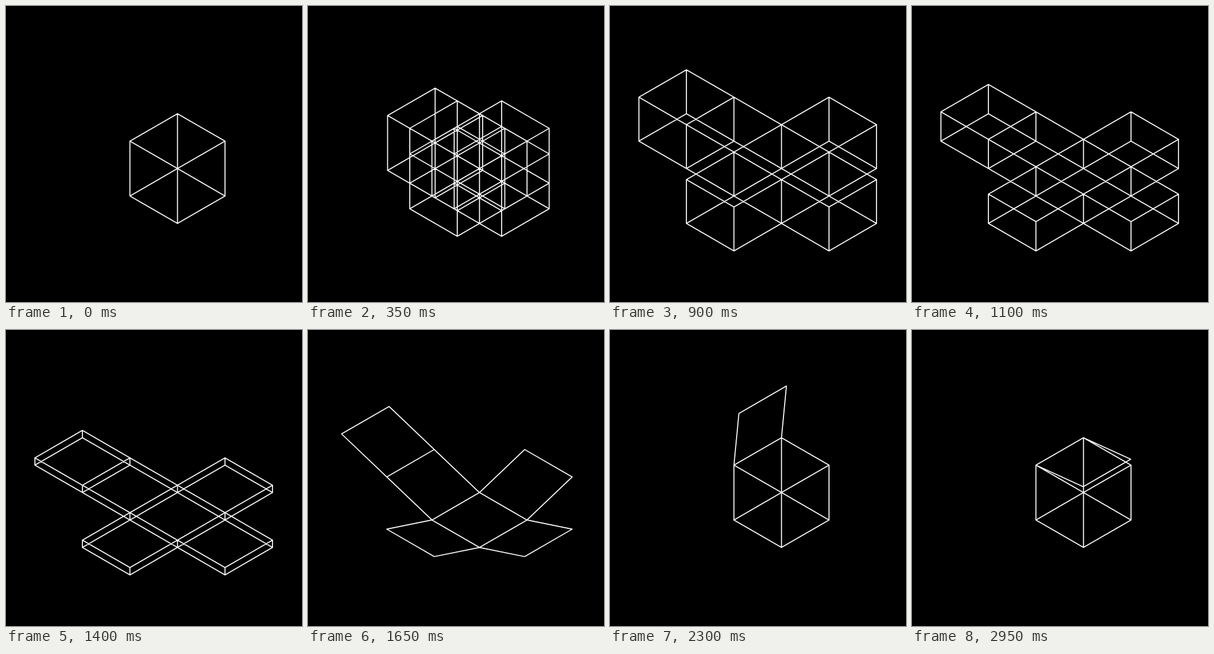
Recreate the animation shown at these times as an HTML page with a canvas. Size 500x500 px, loop 3000 ms.

```html
<!DOCTYPE html>
<html lang="en">
<head>
<meta charset="utf-8">
<title>Unfolding cube</title>
<style>
  html, body { margin: 0; height: 100%; overflow: hidden; background: #000; }
  canvas { display: block; }
</style>
</head>
<body>
<canvas id="stage" width="500" height="500"></canvas>
<script>
const ctx = document.getElementById('stage').getContext('2d');
const LOOP = 3000, STEP = 50, PHASE = 750;
const EDGE = 92.7;
const DX = EDGE * Math.sqrt(3) / 2, DY = EDGE / 2;

// Isometric projection of a point in units of the cube's edge
const project = ([x, y, z]) => [289.65 + (x - y) * DX, 274.6 + (x + y) * DY - z * EDGE];
const add = (p, q) => p.map((v, i) => v + q[i]);

function poly(points, closed = true) {
  points.forEach((p, i) => ctx[i ? 'lineTo' : 'moveTo'](...project(p)));
  if (closed) ctx.closePath();
}

// Parallelogram at p spanned by u and v
const face = (p, u, v) => poly([p, add(p, u), add(add(p, u), v), add(p, v)]);

function box(x, y, h) {
  for (const z of [0, h]) face([x, y, z], [1, 0, 0], [0, 1, 0]);
  for (const [i, j] of [[0, 0], [1, 0], [1, 1], [0, 1]])
    poly([[x + i, y + j, 0], [x + i, y + j, h]], false);
}

function boxes(slide, h) {
  for (const [x, y] of [[0, 0], [1, 0], [0, 1], [0, -1], [-1, 0], [-2, 0]])
    box(x * slide, y * slide, h);
}

function net(fold, lidFold) {
  const c = Math.cos(fold), s = Math.sin(fold);
  const X = [1, 0, 0], Y = [0, 1, 0], back = [-c, 0, s];
  face([0, 0, 0], X, Y);
  face([1, 0, 0], Y, [c, 0, s]);
  face([0, 1, 0], X, [0, c, s]);
  face([0, 0, 0], X, [0, -c, s]);
  face([0, 0, 0], Y, back);
  const a = fold + lidFold;
  face(back, Y, [-Math.cos(a), 0, Math.sin(a)]);
}

function draw(t) {
  const phase = n => Math.min(1, Math.max(0, t / PHASE - n));
  ctx.fillStyle = '#000';
  ctx.fillRect(0, 0, 500, 500);
  ctx.beginPath();
  if (t < 2 * PHASE) boxes(phase(0), 1 - phase(1));
  else net(phase(2) * Math.PI / 2, phase(3) * Math.PI / 2);
  ctx.strokeStyle = '#fff';
  ctx.lineWidth = 1.7;
  ctx.lineJoin = ctx.lineCap = 'round';
  ctx.stroke();
}

const start = performance.now();
function tick() {
  const t = (performance.now() - start) % LOOP;
  draw(Math.floor(t / STEP) * STEP);
  requestAnimationFrame(tick);
}
tick();
</script>
</body>
</html>
```
